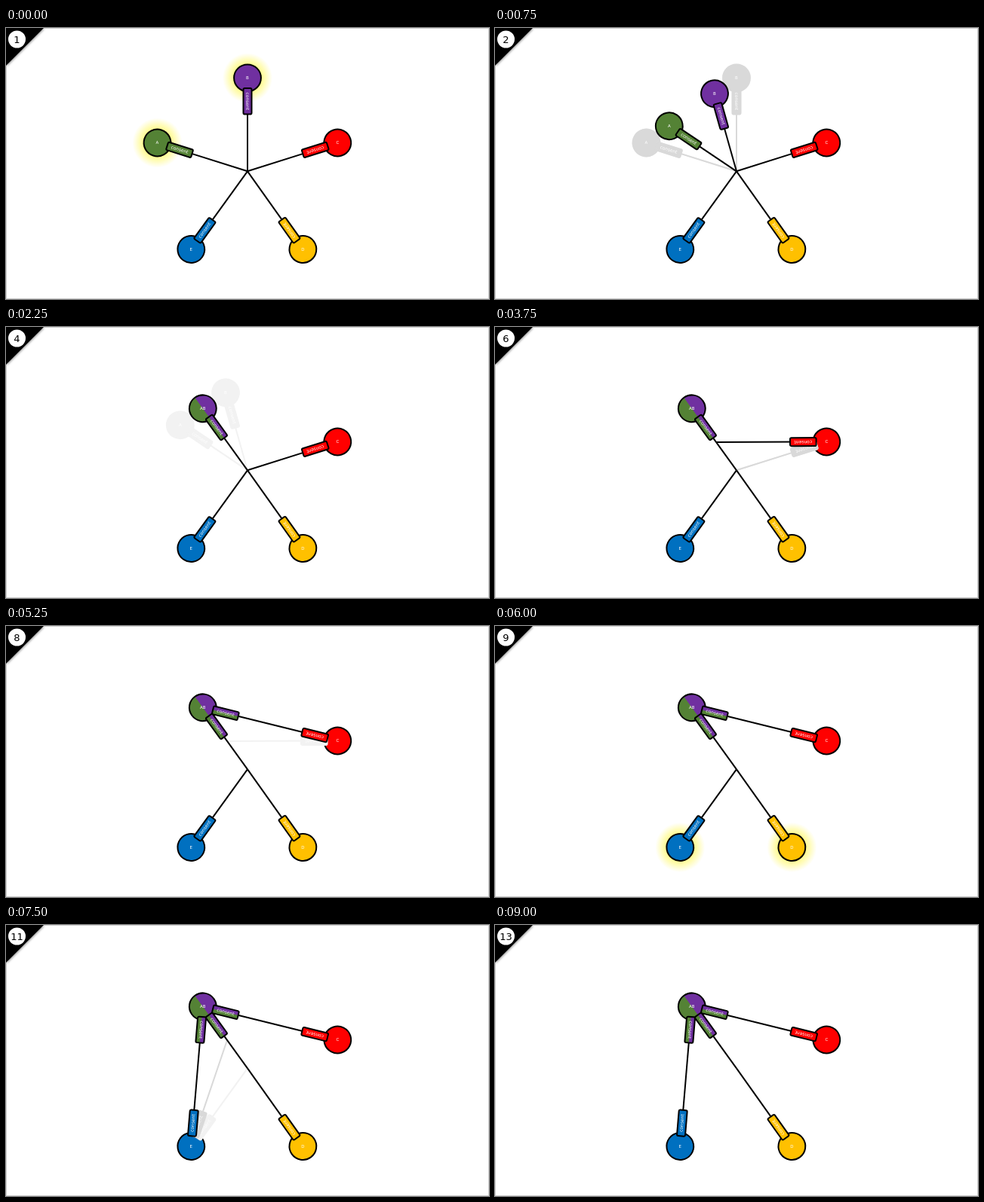
An HTML page with a canvas that plays this animation: 640x360 px, repeating every 9750 ms.

```html
<!DOCTYPE html>
<html lang="en">
<head>
<meta charset="utf-8">
<title>Consent network</title>
<style>
  html, body { margin: 0; width: 100%; height: 100%; overflow: hidden; background: #fff; }
  canvas { display: block; }
</style>
</head>
<body>
<canvas id="stage" width="640" height="360"></canvas>
<script>
const ctx = document.getElementById('stage').getContext('2d');
const STEP_MS = 750, STEPS = 13, TAU = Math.PI * 2;
const FONT = '"DejaVu Sans", sans-serif';
const GREEN = '#548235', PURPLE = '#7030a0';

const node = (label, x, y, ...paint) => ({ label, x, y, paint });
const hub = { x: 320, y: 190.3 };
const halfway = { x: 293, y: 153 };
const a1 = node('A', 200.5, 152.5, GREEN), a2 = node('A', 230.8, 130.3, GREEN);
const b1 = node('B', 320, 66.3, PURPLE), b2 = node('B', 291, 87.2, PURPLE);
const ab = node('AB', 260.8, 108.3, PURPLE, GREEN);
const c = node('C', 439.3, 152.5, '#ff0000');
const d = node('D', 393.4, 294, '#ffc000');
const e = node('E', 245.3, 294, '#0070c0');
const fixed = [c, d, e];
const glows = { 1: [a1, b1], 5: [c], 9: [d, e] };

const movers = step => step < 2 ? [a1, b1] : step < 3 ? [a2, b2] : [ab];
const target = (step, start) => step < start ? hub : step === start ? halfway : ab;

// A stub is a box without its own line.
function legsAt(step) {
  const leg = (from, to, stub = false) => ({ from, to, stub });
  const legs = movers(step).map(n => leg(n, hub));
  legs.push(leg(c, target(step, 6)), leg(d, hub), leg(e, target(step, 10)));
  if (step > 6) legs.push(leg(ab, c, true));
  if (step > 10) legs.push(leg(ab, e, true));
  return legs;
}

const angle = (p, q) => Math.atan2(q.y - p.y, q.x - p.x);

function at(x, y, turn, draw) {
  ctx.save();
  ctx.translate(x, y);
  ctx.rotate(turn);
  draw();
  ctx.restore();
}

function text(str, size, color = '#fff', y = size * 0.36) {
  ctx.font = `${size}px ${FONT}`;
  ctx.textAlign = 'center';
  ctx.fillStyle = color;
  ctx.fillText(str, 0, y);
}

// Fills and outlines a shape; a second paint covers its lower half.
function paintShape(shape, [main, lower], ghost) {
  ctx.fillStyle = ghost || main;
  ctx.fill(shape);
  if (lower && !ghost) {
    ctx.save();
    ctx.clip(shape);
    ctx.fillStyle = lower;
    ctx.fillRect(-30, 0, 60, 30);
    ctx.restore();
  }
  ctx.lineWidth = 2;
  ctx.strokeStyle = ghost || '#000';
  ctx.stroke(shape);
}

const discShape = new Path2D();
discShape.arc(0, 0, 17.9, 0, TAU);
const boxShape = new Path2D();
boxShape.roundRect(-17.3, -5.5, 34.6, 11, 1.8);

function disc(n, ghost) {
  at(n.x, n.y, angle(n, hub), () => paintShape(discShape, n.paint, ghost));
  at(n.x, n.y, 0, () => text(n.label, 5.5));
}

function boxCentre({ from, to }) {
  const turn = angle(from, to);
  return { x: from.x + 31 * Math.cos(turn), y: from.y + 31 * Math.sin(turn), turn };
}

function box(leg, ghost) {
  const p = boxCentre(leg);
  at(p.x, p.y, p.turn, () => {
    paintShape(boxShape, leg.from.paint, ghost);
    text('consent', 6, '#fff', 1.7);
  });
}

function line(leg, color = '#000') {
  if (leg.stub) return;
  const p = boxCentre(leg);
  ctx.beginPath();
  ctx.moveTo(p.x, p.y);
  ctx.lineTo(leg.to.x, leg.to.y);
  ctx.lineWidth = 2;
  ctx.strokeStyle = color;
  ctx.stroke();
}

function glow({ x, y }) {
  const g = ctx.createRadialGradient(x, y, 17, x, y, 33);
  g.addColorStop(0, 'rgba(255,250,120,.9)');
  g.addColorStop(0.45, 'rgba(255,250,140,.6)');
  g.addColorStop(1, 'rgba(255,250,150,0)');
  ctx.fillStyle = g;
  ctx.fillRect(x - 33, y - 33, 66, 66);
}

function trail(step, legs, color) {
  const same = (p, q) => p.from === q.from && p.to === q.to;
  const gone = legsAt(step).filter(p => !legs.some(q => same(p, q)));
  gone.forEach(p => line(p, color));
  gone.forEach(p => { if (!fixed.includes(p.from)) disc(p.from, color); });
  gone.forEach(p => box(p, color));
}

function badge(step) {
  ctx.save();
  ctx.shadowColor = 'rgba(0,0,0,.4)';
  ctx.shadowBlur = 3;
  ctx.shadowOffsetX = ctx.shadowOffsetY = 1;
  ctx.fillStyle = '#000';
  ctx.beginPath();
  ctx.moveTo(0, 0);
  ctx.lineTo(50, 0);
  ctx.lineTo(0, 50);
  ctx.fill();
  ctx.restore();
  ctx.fillStyle = '#fff';
  ctx.beginPath();
  ctx.arc(14.5, 15, 11.5, 0, TAU);
  ctx.fill();
  at(14.5, 15, 0, () => text(step, 13, '#000', 4.8));
}

function drawStep(step) {
  const legs = legsAt(step);
  ctx.fillStyle = '#fff';
  ctx.fillRect(0, 0, 640, 360);
  ctx.lineWidth = 1;
  ctx.strokeStyle = '#d0d0d0';
  ctx.strokeRect(0.5, 0.5, 639, 359);
  (glows[step] || []).forEach(glow);
  fixed.forEach(n => disc(n));
  trail(step - 2, legs, '#f2f2f2');
  trail(step - 1, legs, '#d9d9d9');
  legs.forEach(p => line(p));
  movers(step).forEach(n => disc(n));
  legs.forEach(p => box(p));
  badge(step);
}

const start = performance.now();
function tick() {
  const elapsed = Math.max(0, performance.now() - start);
  drawStep(Math.floor(elapsed / STEP_MS) % STEPS + 1);
  requestAnimationFrame(tick);
}
tick();
</script>
</body>
</html>
```
